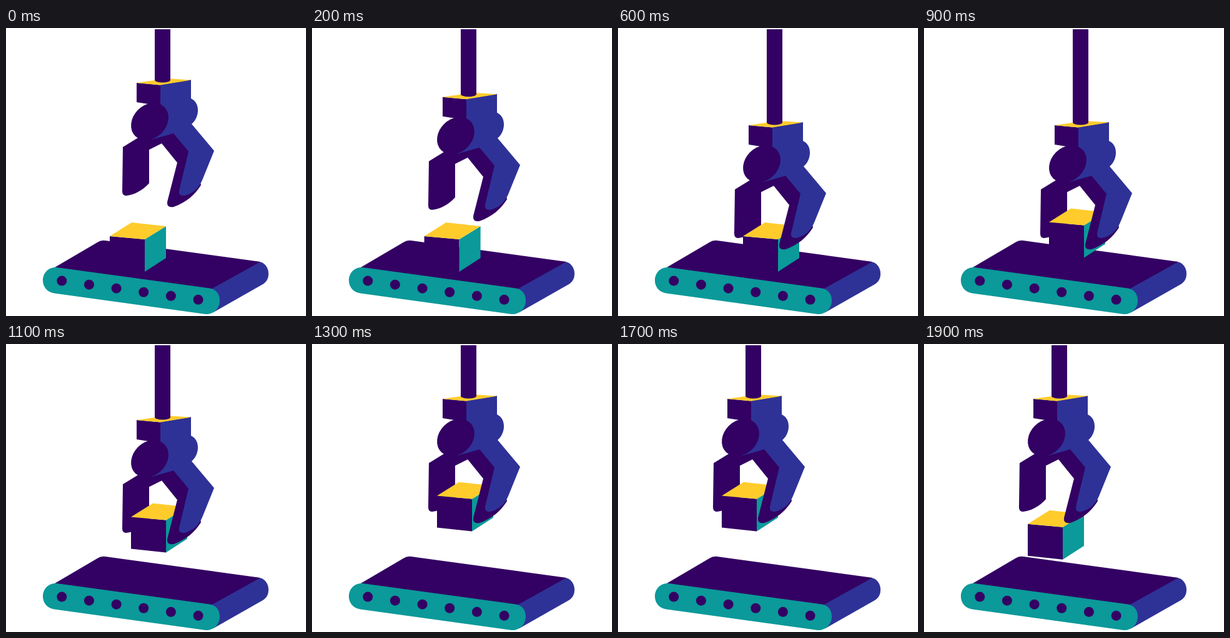
An HTML page that plays this animation: 480x462 px, repeating every 2 s.

```html
<!DOCTYPE html>
<html lang="en">
<head>
<meta charset="utf-8">
<title>Conveyor and claw</title>
<style>
  html, body { margin: 0; width: 100%; height: 100%; overflow: hidden; background: #fff; }
  svg { display: block; width: 100vw; height: 100vh; }
  .dark { fill: #330063; }
  .blue { fill: #2e3296; }
  .teal { fill: #0b9999; }
  .gold { fill: #ffcc2c; }
</style>
</head>
<body>
<svg viewBox="0 0 480 462">
  <g id="belt">
    <path class="blue" d="M404 375C414 375 420 385 420 394C420 402 417 407 411 411L332 456L300 430Z"/>
    <path class="dark" d="M78 384L146 344Q152 340 159 341L407 375L328 419L200 410Z"/>
    <path class="teal" d="M81 384L326 417.5C337 419 342 428 342 437C342 450 332 460 319 459L77 425.5C66 424 59 415 59 405C59 393 68 383 81 384Z"/>
  </g>
  <g class="claw dark">
    <path d="M187 191L213 175L250 180L249 185L229 195V249C219 260 205 268 192 269Q186 269 186 262Z"/>
  </g>
  <g id="box">
    <path class="dark" d="M166 334L222 339V391L166 385Z"/>
    <path class="teal" d="M222 339L256 318V369L222 391Z"/>
    <path class="gold" d="M166 334L201 312L256 318L222 339Z"/>
  </g>
  <g class="claw">
    <path class="dark" d="M222 179L268 165L300 198L312 252C302 268 288 280 268 287Q257 289 258 279L274 216L249 185L229 195Z"/>
    <path class="blue" d="M247 91L296 83V113C304 117 307 124 307 132C307 141 303 149 297 154L333 197L314 244C308 258 298 266 285 269Q276 270 277 261L292 198L268 169L233 179L240 120Z"/>
    <path class="dark" d="M209 88L247 91.5V125L209 119Z"/>
    <ellipse class="dark" rx="33" ry="26.5" transform="translate(230 150) rotate(-45)"/>
    <path class="gold" d="M209 88L258 81L296 83.5L247 91.5Z"/>
  </g>
  <path id="rod" class="dark"/>
</svg>
<script>
  const LOOP = 2000, STEP = 100;
  const DROP = 68, SHIFT = 34, GRIP = 22.5;
  const svg = document.querySelector('svg');
  const belt = document.getElementById('belt');
  const box = document.getElementById('box');
  const rod = document.getElementById('rod');
  const claws = document.querySelectorAll('.claw');

  for (let i = 0; i < 6; i++) {
    const hole = document.createElementNS(svg.namespaceURI, 'circle');
    hole.setAttribute('class', 'dark');
    hole.setAttribute('cx', 89.3 + 43.65 * i);
    hole.setAttribute('cy', 405.6 + 6.05 * i);
    hole.setAttribute('r', 8);
    belt.append(hole);
  }

  // Linear progress from 0 to 1 between two times.
  const ramp = (t, from, to) => Math.min(1, Math.max(0, (t - from) / (to - from)));
  const move = (el, x, y) => el.setAttribute('transform', `translate(${x} ${y})`);

  function draw(t) {
    const rise = DROP * ramp(t, 950, 1250);
    const x = -SHIFT * ramp(t, 1400, 1700);
    const y = DROP * ramp(t, 0, 600) - rise;
    const lift = (GRIP * ramp(t, 700, 900) + rise) * (1 - ramp(t, 1800, 2000));

    claws.forEach(el => move(el, x, y));
    move(box, SHIFT * ramp(t, 0, 500) + x, -lift);
    rod.setAttribute('d', `M${238 + x} 2h25V${83.5 + y}a12.5 4 0 0 1 -25 0Z`);
  }

  const start = performance.now();
  function tick() {
    const t = (performance.now() - start) % LOOP;
    draw(Math.floor(t / STEP) * STEP);
    requestAnimationFrame(tick);
  }
  tick();
</script>
</body>
</html>
```
